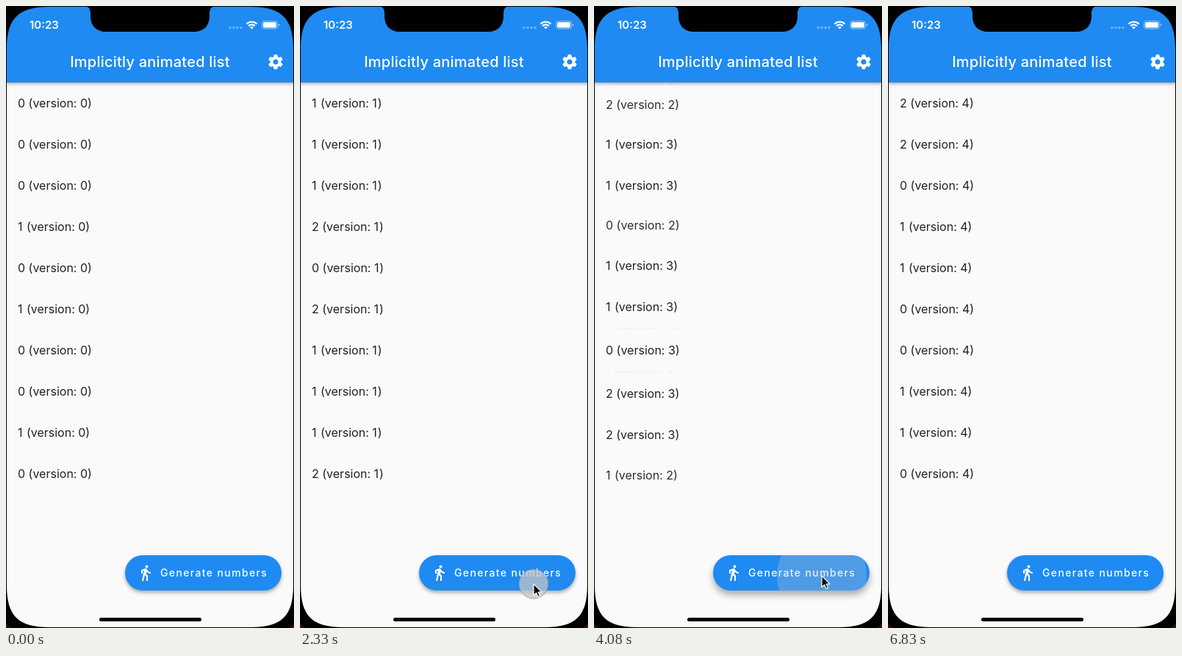
An HTML page that plays this animation: 392x846 px, repeating every 7660 ms.

```html
<!DOCTYPE html>
<html lang="en">
<head>
<meta charset="utf-8">
<title>Implicitly animated list</title>
<style>
  html, body { margin: 0; width: 100%; height: 100%; overflow: hidden; background: #fafafa; }
  body { position: relative; font-family: Inter, "Open Sans", sans-serif; }
  #list { position: absolute; left: 16px; top: 104px; color: rgba(0, 0, 0, .87); font-size: 16px; }
  #list div { overflow: hidden; width: 340px; }
  #list p { margin: 0; height: 56px; line-height: 56px; white-space: pre; }
  #list i { font-style: normal; margin-right: .9px; }
  #bar { position: absolute; left: 0; top: 0; width: 392px; height: 104px; background: #1f8af2;
    box-shadow: 0 2px 4px rgba(0, 0, 0, .32); color: #fff; }
  #bar h1 { margin: 0; position: absolute; top: 56px; width: 100%; text-align: center;
    font-size: 20px; line-height: 40px; font-weight: 500; letter-spacing: .22px; }
  #clock { position: absolute; left: 32px; top: 16px; font-size: 15px; line-height: 20px; font-weight: 600; }
  #fab { position: absolute; left: 162px; top: 747px; width: 213px; height: 48px; border-radius: 24px;
    background: #1f8af2; color: #fff; }
  #fab span { position: absolute; left: 48px; line-height: 48px; font-size: 14px; font-weight: 500;
    letter-spacing: 1.37px; white-space: pre; }
  svg { position: absolute; left: 0; top: 0; }
</style>
</head>
<body>
<div id="list"></div>
<div id="bar"><span id="clock">10:23</span><h1>Implicitly animated list</h1></div>
<div id="fab"><span>Generate numbers</span></div>
<svg width="392" height="846" viewBox="0 0 392 846">
  <defs>
    <clipPath id="fan"><path d="M334.5 31.5l-12-12h24z"/></clipPath>
    <clipPath id="pill"><rect x="162" y="747" width="213" height="48" rx="24"/></clipPath>
    <path id="tooth" d="M-1.9-9.6H1.9L2.8-5.5H-2.8Z" stroke="#fff" stroke-width=".8" stroke-linejoin="round"/>
  </defs>
  <g fill="#fff">
    <g id="dots" opacity=".35"></g>
    <g clip-path="url(#fan)">
      <circle cx="334.5" cy="31.5" r="3.6"/>
      <g fill="none" stroke="#fff" stroke-width="2.2">
        <circle cx="334.5" cy="31.5" r="6.2"/><circle cx="334.5" cy="31.5" r="10"/>
      </g>
    </g>
    <rect x="348.5" y="20.5" width="21" height="10.5" rx="3" fill="none" stroke="#fff" stroke-opacity=".5"/>
    <rect x="350" y="22" width="18" height="7.5" rx="1.7"/>
    <path d="M371 24q1.6.7 1.6 1.8T371 27.6z" opacity=".6"/>
    <g transform="translate(367 76)">
      <circle r="5.5" fill="none" stroke="#fff" stroke-width="4"/><g id="gear"></g>
    </g>
    <path transform="translate(178 759)" d="M13.5 5.5c1.1 0 2-.9 2-2s-.9-2-2-2-2 .9-2 2 .9 2 2 2zM9.8 8.9L7 23h2.1l1.8-8 2.1 2v6h2v-7.5l-2.1-2 .6-3C14.8 12 16.8 13 19 13v-2c-1.9 0-3.5-1-4.3-2.4l-1-1.6c-.4-.6-1-1-1.7-1-.3 0-.5.1-.8.1L6 8.3V13h2V9.6l1.8-.7"/>
  </g>
  <g clip-path="url(#pill)"><circle id="ink" fill="#c8c8c8"/></g>
  <rect x="127" y="832" width="139" height="5" rx="2.5"/>
  <path fill-rule="evenodd" d="M0 0H392V846H0ZM1 58V788C1 830 17 845 59 845H333C375 845 391 830 391 788V58C391 17 375 1 333 1H59C17 1 1 17 1 58Z"/>
  <path d="M107 0Q115 1 115 9V14C115 27 123 35 136 35H256C269 35 277 27 277 14V9Q277 1 285 0Z"/>
  <path d="M0 838Q2 844 8 846H0ZM392 838Q390 844 384 846H392Z" fill="#3a0c0c"/>
  <circle id="touch" r="20" fill="#c4c4c4" fill-opacity=".75" stroke="#808080" stroke-opacity=".6"/>
  <path id="cursor" d="M0 0V15.5L3.6 12.2L6 17.6L8.6 16.5L6.2 11.2H11Z" stroke="#fff" stroke-width="1.2" stroke-linejoin="round"/>
</svg>
<script>
const $ = id => document.getElementById(id);
const LOOP = 7660, FPS = 12, ROW = 56, MOVE = 300, HOLD = 172, INK_DELAY = 100;
const taps = [1000, 2500, 4033, 5750];  // moments of release
// "=" kept, "+" inserted, "-" removed; one entry per version of the list
const edits = [
  "=0=0=0=1=0=1=0=0=1=0",
  "+1+1+1+2=0+2-0-0=1-0=1-0-0=1+2-0",
  "+2=1=1-1-2=0-2=1=1+0+2+2=1-2",
  "+1-2=1=1-0=1=1+2=0+1=2=2-1",
  "+2+2+0=1=1+0+0=1=1+0-1-2-0-1-2-2"
].map(s => s.match(/../g));
// time, x, y of the pointer tip
const path = [[83, 350, 850], [800, 291, 778], [1333, 291, 778], [1667, 318, 786], [2500, 318, 786],
  [2750, 314, 815], [3000, 304, 800], [3083, 304, 800], [3417, 309, 793], [3500, 309, 793],
  [3750, 310, 775], [4333, 310, 775], [4583, 311, 775], [6740, 311, 775]];

const clamp = v => Math.min(1, Math.max(0, v));
const smooth = v => v * v * (3 - 2 * v);

// cubic-bezier(.42, 0, .58, 1)
function ease(x) {
  let lo = 0, hi = 1;
  for (let i = 0; i < 20; i++) {
    const s = (lo + hi) / 2, r = 1 - s;
    if (1.26 * s * r * r + 1.74 * s * s * r + s ** 3 < x) lo = s; else hi = s;
  }
  return x >= 1 ? 1 : smooth(lo);
}

function pointer(t) {
  const i = path.findIndex(k => k[0] > t);
  if (i < 1) return null;
  const [a, x, y] = path[i - 1], [b, u, v] = path[i], p = smooth((t - a) / (b - a));
  return [x + (u - x) * p, y + (v - y) * p];
}

function drawList(t) {
  const version = taps.filter(tap => tap <= t).length;
  const p = version ? ease(clamp((t - taps[version - 1]) / MOVE)) : 1;
  $("list").innerHTML = edits[version].map(([op, n]) => {
    const size = op == "+" ? p : op == "-" ? 1 - p : 1, h = ROW * size;
    const v = op == "-" ? version - 1 : version;
    const label = `${n} (version: ${v})`.replace(/1/g, "<i>1</i>");
    return `<div style="height:${h}px;opacity:${size}"><p style="margin-top:${(h - ROW) / 2}px">${label}</p></div>`;
  }).join("");
}

function drawTap(t, tip) {
  const tap = taps.find(at => t >= at - HOLD && t < at + 500);
  const since = tap ? t - tap : 999;
  const inkTime = since + HOLD - INK_DELAY;
  const lift = clamp(inkTime / 120) * clamp((400 - since) / 250);
  const set = (id, name, value) => $(id).setAttribute(name, value);
  const show = (id, on) => set(id, "visibility", on ? "visible" : "hidden");

  $("fab").style.boxShadow = `0 ${3 + 3 * lift}px ${5 + 5 * lift}px rgba(0,0,0,.32)`;
  show("cursor", tip);
  show("touch", tip && since < 0);
  show("ink", tip && inkTime > 0 && since < 200);
  if (!tip) return;
  for (const id of ["cursor", "touch", "ink"]) set(id, "transform", `translate(${tip})`);
  // the ink creeps while held and spreads quickly once released
  const radius = .152 * Math.min(inkTime, HOLD - INK_DELAY) + Math.max(0, since);
  set("ink", "r", Math.max(0, radius));
  set("ink", "opacity", .38 * clamp(1 - since / 200));
}

$("gear").innerHTML = [0, 60, 120, 180, 240, 300]
  .map(a => `<use href="#tooth" transform="rotate(${a})"/>`).join("");
$("dots").innerHTML = [305, 310, 315, 320]
  .map(x => `<circle cx="${x}" cy="29.5" r="1.8"/>`).join("");

const start = performance.now();
function frame() {
  const now = (performance.now() - start) % LOOP;
  const t = Math.floor((now + 7) * FPS / 1000) * 1000 / FPS;
  drawList(t);
  drawTap(t, pointer(t));
  requestAnimationFrame(frame);
}
frame();
</script>
</body>
</html>
```
